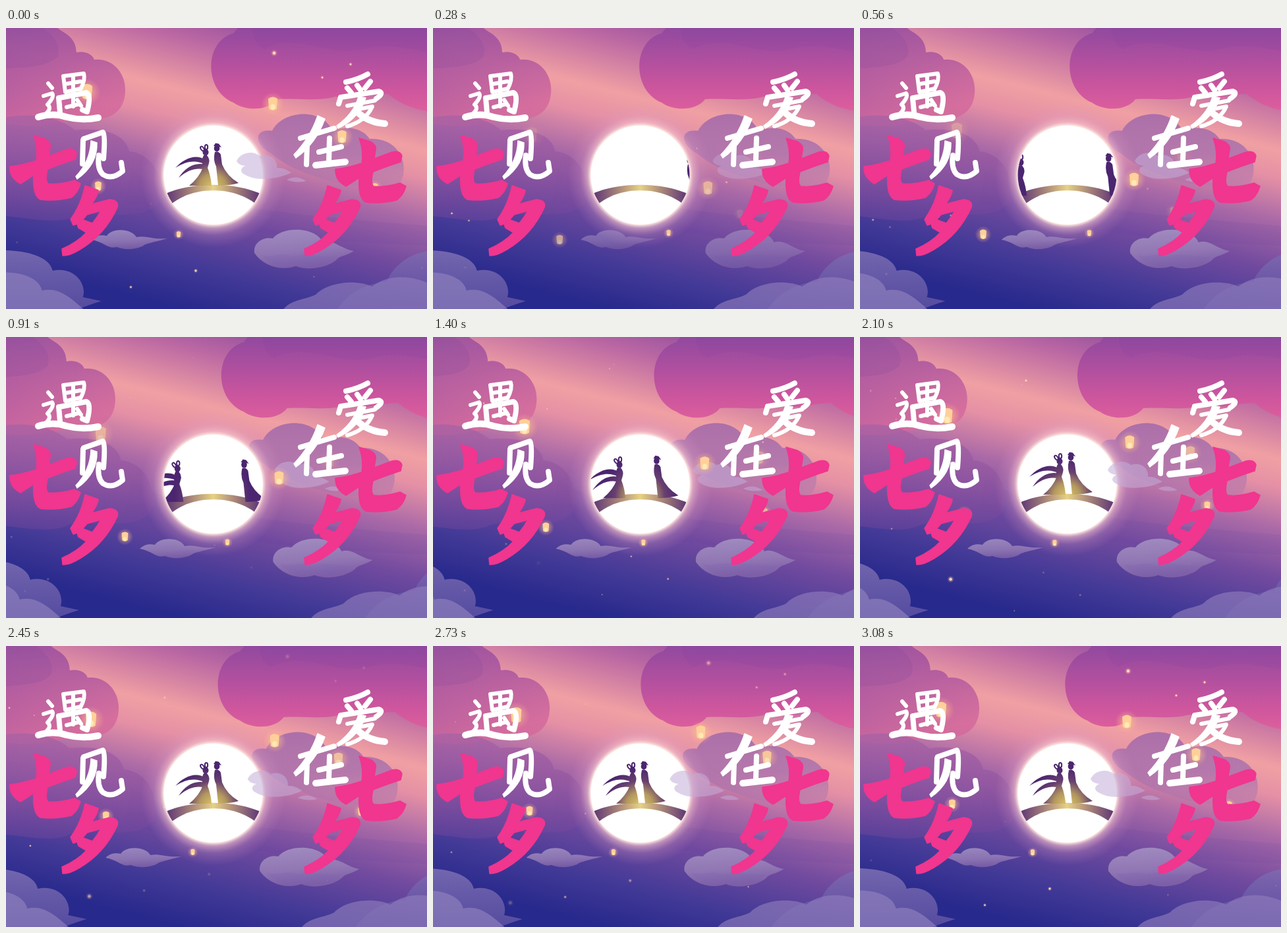
Write an HTML page that moves like this. It is 639 by 426 pixels and loops after 3150 ms.

```html
<!DOCTYPE html>
<html lang="zh">
<head>
<meta charset="utf-8">
<title>七夕</title>
<style>
html, body { margin: 0; width: 100%; height: 100%; overflow: hidden; background: #7a4f9f; }
svg { display: block; width: 100vw; height: 100vh; }
.brush { fill: none; stroke: #fff; stroke-width: 8; stroke-linecap: round; stroke-linejoin: round; }
.brush .thin { stroke-width: 6; }
.brush .wide { stroke-width: 10; }
.brush .taper { fill: #fff; stroke-width: 1.5; }
.pink { fill: #f0368f; stroke: #f0368f; stroke-width: 1.5; stroke-linejoin: round; }
</style>
</head>
<body>
<svg viewBox="0 0 639 426" preserveAspectRatio="none">
  <defs>
    <linearGradient id="sky" gradientUnits="userSpaceOnUse" x1="380" y1="-20" x2="270" y2="426">
      <stop offset="0" stop-color="#8d4a9e"/>
      <stop offset=".13" stop-color="#bb68a3"/>
      <stop offset=".3" stop-color="#f0a0a3"/>
      <stop offset=".39" stop-color="#e590a5"/>
      <stop offset=".53" stop-color="#a969a7"/>
      <stop offset=".68" stop-color="#734b9f"/>
      <stop offset=".85" stop-color="#443a97"/>
      <stop offset="1" stop-color="#27298c"/>
    </linearGradient>
    <linearGradient id="topLeft" x2=".4" y2="1">
      <stop offset="0" stop-color="#88479e"/>
      <stop offset=".55" stop-color="#ad559f"/>
      <stop offset="1" stop-color="#d4699c"/>
    </linearGradient>
    <linearGradient id="topRight" x2="0" y2="1">
      <stop offset="0" stop-color="#8b489f"/>
      <stop offset=".4" stop-color="#ae4f9f"/>
      <stop offset=".75" stop-color="#ce569d"/>
      <stop offset="1" stop-color="#de609d"/>
    </linearGradient>
    <linearGradient id="dusk" x2="0" y2="1">
      <stop offset="0" stop-color="#a962a4" stop-opacity=".8"/>
      <stop offset=".6" stop-color="#8b529f" stop-opacity=".7"/>
      <stop offset="1" stop-color="#6f469c" stop-opacity=".45"/>
    </linearGradient>
    <linearGradient id="mauve" x2="0" y2="1">
      <stop offset="0" stop-color="#ac6fa9"/>
      <stop offset=".55" stop-color="#a871ad" stop-opacity=".8"/>
      <stop offset="1" stop-color="#9f70b0" stop-opacity=".2"/>
    </linearGradient>
    <linearGradient id="lilac" x2=".2" y2="1">
      <stop offset="0" stop-color="#a897c5"/>
      <stop offset=".6" stop-color="#9980b8"/>
      <stop offset="1" stop-color="#8264a9"/>
    </linearGradient>
    <linearGradient id="corner" x2="0" y2="1">
      <stop offset="0" stop-color="#7f70b4"/>
      <stop offset="1" stop-color="#5c50a2"/>
    </linearGradient>
    <radialGradient id="halo">
      <stop offset=".68" stop-color="#fff1e6"/>
      <stop offset=".73" stop-color="#f5c4cf" stop-opacity=".6"/>
      <stop offset=".83" stop-color="#dfa0c4" stop-opacity=".24"/>
      <stop offset="1" stop-color="#d890c0" stop-opacity="0"/>
    </radialGradient>
    <radialGradient id="gilding" gradientUnits="userSpaceOnUse" cx="314" cy="242" r="58">
      <stop offset="0" stop-color="#dfc668"/>
      <stop offset=".35" stop-color="#b3985f"/>
      <stop offset=".65" stop-color="#68406f"/>
      <stop offset="1" stop-color="#4b2570"/>
    </radialGradient>
    <linearGradient id="deck" gradientUnits="userSpaceOnUse" x1="242" x2="387">
      <stop offset="0" stop-color="#5b3276"/>
      <stop offset=".25" stop-color="#a27f78"/>
      <stop offset=".5" stop-color="#e7d184"/>
      <stop offset=".75" stop-color="#a27f78"/>
      <stop offset="1" stop-color="#5b3276"/>
    </linearGradient>
    <radialGradient id="flame">
      <stop offset="0" stop-color="#ffd28c" stop-opacity=".75"/>
      <stop offset="1" stop-color="#ffb08c" stop-opacity="0"/>
    </radialGradient>
    <clipPath id="disc"><circle cx="314.500" cy="223" r="75"/></clipPath>
    <mask id="couple" maskUnits="userSpaceOnUse" x="220" y="140" width="190" height="170">
      <g fill="#fff">
        <g id="lady">
          <ellipse cx="303" cy="188.500" rx="4.500" ry="5"/>
          <g fill="none" stroke="#fff" stroke-width="2">
            <ellipse cx="298" cy="183" rx="2.200" ry="3.800" transform="rotate(-35 298 183)"/>
            <ellipse cx="304" cy="180.500" rx="2.200" ry="3.600"/>
          </g>
          <path d="M300,193H305Q310,199 308,205L306,212Q311,225 312,239H278Q293,227 299,211Q296,200 300,193Z"/>
          <path d="M304,201C290,190 272,196 257,212C275,201 288,200 303,207Z"/>
          <path d="M302,207C286,203 272,212 262,227C276,215 288,212 299,214Z"/>
        </g>
        <g id="lord">
          <ellipse cx="320" cy="182.500" rx="4.300" ry="5"/>
          <path d="M315,179L318,174.500L323,175.500L327,181L320,179Z"/>
          <path d="M317,188Q323,186 326,192L328,207Q335,224 353,235Q340,239 322,239L319,210Q314,200 317,188Z"/>
        </g>
      </g>
    </mask>
    <path id="seven" d="M42,163L59,168Q69,174 67,181L65,194L92,184Q104,181 107,190L105,199Q86,205 63,214Q59,232 64,236Q80,238 104,231L113,236Q109,250 99,257Q74,263 52,260Q40,254 42,223L22,236Q5,227 6,210Q25,208 46,201Q49,182 42,163Z"/>
    <path id="dusktide" d="M120,239L140,246Q140,253 130,267L157,260Q172,261 169,272Q150,314 112,336Q95,346 86,345L85,335Q108,325 122,310L110,303Q106,296 112,289L131,296Q139,286 144,277L123,283Q112,297 102,299L98,290Q114,268 120,239Z"/>
  </defs>

  <rect width="639" height="426" fill="url(#sky)"/>
  <path d="M190,215C260,260 330,275 639,300V330C400,320 280,300 180,270Z" fill="#5a3f9c" opacity=".1"/>

  <g id="westTop" fill="url(#topLeft)">
    <path d="M-60,-10H70C78,8 106,6 107,37C120,34 132,40 134,48C165,45 183,72 181,97C180,122 164,137 138,138C110,142 90,140 70,146C30,155 0,140 -60,142Z" opacity=".85"/>
    <path d="M-60,-10H40C72,8 85,25 78,44C60,62 20,60 -60,64Z" fill="#74409a" opacity=".15"/>
  </g>
  <path id="westMid" d="M-60,155C0,125 70,125 105,155C145,150 182,160 187,187C225,190 242,232 232,264C205,300 130,270 100,288C60,300 10,280 -60,282Z" fill="url(#dusk)"/>
  <path id="eastMid" d="M402,190C376,176 376,152 404,156C420,124 480,120 496,156C515,148 540,150 552,168C600,166 614,212 597,237C550,246 500,238 470,225C440,216 420,205 402,190Z" fill="url(#mauve)"/>
  <g id="eastTop">
    <path d="M360,-10H730V126C680,130 620,135 580,100C550,100 540,110 500,104C470,112 440,106 411,108C400,124 366,128 345,113C300,95 300,20 345,8Z" fill="url(#topRight)"/>
    <path d="M375,-10H730V40C640,50 600,15 540,32C490,45 440,5 392,32C378,25 372,10 375,-10Z" fill="#703b9b" opacity=".12"/>
  </g>

  <g id="stars" fill="#ffdcc0"></g>

  <circle cx="314.500" cy="223" r="110" fill="url(#halo)"/>
  <circle cx="314.500" cy="223" r="75" fill="#fff"/>
  <g clip-path="url(#disc)">
    <path d="M238,253C280,232.500 348,232.500 391,253L377,265C343,240 285,240 252,266Z" fill="url(#deck)"/>
    <rect x="220" y="140" width="190" height="170" fill="url(#gilding)" mask="url(#couple)"/>
  </g>

  <g id="wisp" fill="#c3aed9">
    <path d="M350,202C354,190 374,184 385,194C400,188 413,200 411,212C422,211 428,217 433,219C415,229 380,233 364,223C352,218 358,210 364,209Q354,209 350,202Z" opacity=".55"/>
    <path d="M426,230Q440,222 456,232Q440,236 426,230Z" opacity=".5"/>
  </g>
  <path id="drift" d="M130,321C138,313 147,314 153,315C160,303 190,303 198,317C212,314 222,321 245,319C225,325 213,326 207,331C190,338 176,335 168,332C155,336 148,324 130,321Z" fill="url(#lilac)" fill-opacity=".82"/>
  <g id="raft">
    <path d="M377,341C375,324 392,316 405,319C420,300 470,301 481,325C496,319 510,336 528,338C516,346 506,345 501,352C487,364 456,368 440,361C418,369 390,361 377,341Z" fill="url(#lilac)" opacity=".85"/>
    <path d="M388,344C405,350 420,338 436,347C455,338 480,350 500,346C485,361 455,365 440,358C420,364 398,357 388,344Z" fill="#7b62ad" opacity=".2"/>
  </g>

  <g id="westLow">
    <path d="M-60,340C25,330 66,345 71,368C102,361 124,387 117,408L145,414Q125,420 100,430H-60Z" fill="url(#corner)" opacity=".85"/>
    <path d="M-60,380C5,360 50,374 55,398C80,392 100,410 122,430H-60Z" fill="#9585c0" opacity=".6"/>
  </g>
  <g id="eastLow">
    <path d="M500,430C520,400 545,388 578,384C585,365 610,340 645,338C690,330 730,345 740,360V430Z" fill="url(#corner)" opacity=".7"/>
    <path d="M418,430C430,411 455,412 470,404C490,383 535,382 555,392C590,365 640,382 660,398L740,390V430Z" fill="#8f7bbc" opacity=".65"/>
  </g>

  <g id="lanterns"></g>

  <g class="brush" aria-label="遇见爱在">
    <path class="thin" d="M64,84l6,7M57,103L70,99Q74,104 63,116Q71,122 58,132"/>
    <path class="wide" d="M49,135Q72,128 92,135Q115,141 140,136"/>
    <path class="thin" d="M87,73L90,97M87,73L118,69Q121,78 113,93M90,85L113,81M91,97L113,92M102,72L102,119M92,120L112,115M108,109l6,9"/>
    <path d="M80,106L82,128M81,106L122,98Q130,101 123,127l-7,-3"/>
    <path d="M117,170L116,206M118,168L147,158Q151,162 148,198"/>
    <path class="taper" d="M129,171L138,174Q139,207 108,229L106,225Q128,202 129,171Z"/>
    <path d="M141,193Q138,213 147,222Q161,231 177,217L175,204"/>
    <path d="M549,70Q535,78 516,82M518,91l6,7M533,87l5,7M553,81l-8,10"/>
    <path d="M508,105L505,115M508,105L566,96Q574,99 562,107"/>
    <path class="thin" d="M518,118L560,110M530,124L556,119Q546,141 518,149"/>
    <path class="taper" d="M535,104L546,106Q535,138 504,152L502,148Q528,130 535,104Z"/>
    <path class="wide" d="M534,128Q550,143 575,145"/>
    <path d="M447,167L498,152M457,178L456,207M491,167L490,203M475,188L509,180"/>
    <path class="taper" d="M473,133L484,138Q470,176 440,197L437,192Q462,166 473,133Z"/>
    <path class="wide" d="M470,208L515,203"/>
  </g>
  <g class="pink" aria-label="七夕">
    <use href="#seven"/><use href="#seven" x="494" y="4"/>
    <use href="#dusktide"/><use href="#dusktide" x="368"/>
  </g>
</svg>
<script>
const STEP = 70, LOOP = 3150, LAST = LOOP - STEP;
const byId = id => document.getElementById(id);
const clamp = v => Math.max(0, Math.min(1, v));

function add(parent, tag, attrs) {
  const el = document.createElementNS("http://www.w3.org/2000/svg", tag);
  for (const key in attrs) el.setAttribute(key, attrs[key]);
  return parent.appendChild(el);
}
function move(el, x, y = 0) {
  el.setAttribute("transform", `translate(${x.toFixed(2)} ${y.toFixed(2)})`);
}

// Horizontal sway in pixels, out and back once per loop.
const sways = { westTop: -24.5, westMid: -20, eastMid: -22.5, eastTop: 25, westLow: -55, eastLow: 68 };
// Steady leftward drift, in pixels per ms.
const drifts = { wisp: 0.0266, drift: 0.0337, raft: 0.0131 };

// Position at 560 ms, position at the end of the loop, size, fade-in time.
const lanterns = [
  { from: [416, 230], to: [405, 115], size: 15.5, fade: 400 },
  { from: [187, 313], to: [140, 240], size: 11, fade: 400 },
  { from: [147, 156], to: [123, 97], size: 18, fade: 1400 },
  { from: [348, 311], to: [262, 313], size: 7, fade: 300 },
  { from: [475, 278], to: [560, 242], size: 10, fade: 1800 },
  { from: [488, 192], to: [510, 165], size: 15, fade: 3000 }
].map(spec => {
  const el = add(byId("lanterns"), "g", {}), s = spec.size;
  add(el, "circle", { r: s * 1.15, fill: "url(#flame)" });
  add(el, "path", {
    d: `M${-s * .45},${-s * .5}Q0,${-s * .85} ${s * .45},${-s * .5}L${s * .38},${s * .5}Q0,${s * .75} ${-s * .38},${s * .5}Z`,
    fill: "#ffd09a"
  });
  add(el, "ellipse", { cy: s * .3, rx: s * .24, ry: s * .26, fill: "#ffe9b4" });
  return { ...spec, el };
});

let seed = 17;
const random = () => (seed = seed * 16807 % 2147483647) / 2147483647;
const stars = [
  [407, 38, 3080, 2.2], [523, 55, 3080, 1.3], [480, 75, 3080, 1.2], [192, 390, 3000, 1.2],
  [288, 368, 3080, 1.4], [136, 369, 2150, 2.2], [252, 66, 2100, 1.2], [40, 373, 560, 1.1]
];
for (let i = 0; i < 20; i++) stars.push([random() * 639, random() * 420, random() * LAST, .6 + random() * .5]);
const starDots = stars.map(([x, y, peak, r]) => {
  const el = add(byId("stars"), "g", {});
  add(el, "circle", { r: r * 2.5, fill: "url(#flame)" });
  add(el, "circle", { r });
  return { x, y, peak, el };
});

function draw(now) {
  const t = Math.floor(now % LOOP / STEP) * STEP || LAST;
  const sway = (1 - Math.cos(2 * Math.PI * t / LOOP)) / 2;
  for (const id in sways) move(byId(id), sways[id] * sway);
  for (const id in drifts) {
    move(byId(id), drifts[id] * (LAST - t));
    byId(id).setAttribute("opacity", clamp(t / 400));
  }

  const gap = 59 * Math.max(0, (1830 - t) / 1270);
  move(byId("lady"), -gap, gap * .26);
  move(byId("lord"), gap * .97, gap * .26);

  for (const { el, from, to, fade } of lanterns) {
    const k = (t - 560) / (LAST - 560);
    move(el, from[0] + (to[0] - from[0]) * k, from[1] + (to[1] - from[1]) * k);
    el.setAttribute("opacity", clamp(t / fade));
  }
  for (const { el, x, y, peak } of starDots) {
    const age = t - peak;
    move(el, x - age * .032, y + age * .035);
    el.setAttribute("opacity", clamp(1 - Math.abs(age) / 800));
  }
}

const start = performance.now();
function tick() {
  draw(performance.now() - start);
  requestAnimationFrame(tick);
}
tick();
</script>
</body>
</html>
```
